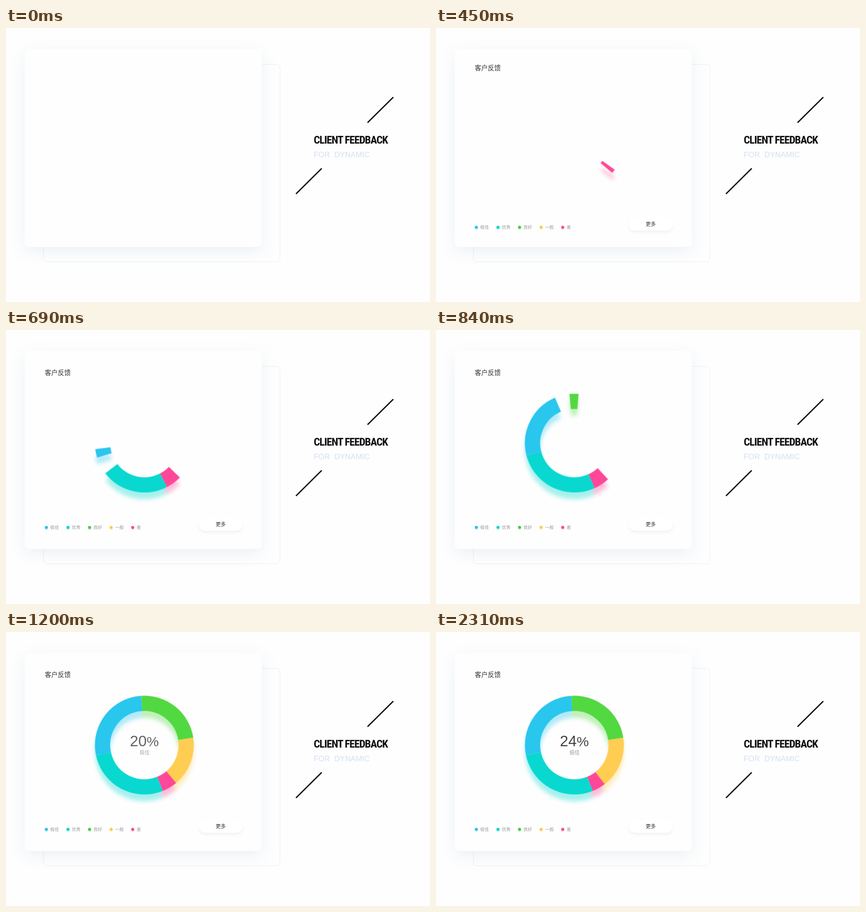
These frames come from a looping animation (930x602 px, 2340 ms). An HTML page:

```html
<!DOCTYPE html>
<html lang="zh-CN">
<head>
<meta charset="utf-8">
<title>Client feedback</title>
<style>
@property --n { syntax: "<integer>"; inherits: true; initial-value: 0; }

:root {
  --loop: 2340ms;
  --sine: cubic-bezier(.37, 0, .63, 1);
  --quad: cubic-bezier(.5, 1, .89, 1);
  --cubic: cubic-bezier(.33, 1, .68, 1);
  --cjk: "Noto Sans CJK SC", "Noto Sans CJK", "Noto Sans CJK JP", sans-serif;
  --blue: #29c6ee; --teal: #09d8d0; --green: #52d840; --yellow: #ffcd52; --pink: #ff4897;
}
html, body { margin: 0; width: 100%; height: 100%; overflow: hidden; background: #fefefe; }
svg, .card, .button, .count { position: absolute; }
svg { left: 0; top: 0; }
text { white-space: pre; }

.card {
  left: 41px; top: 46px; width: 520px; height: 435px; border-radius: 9px;
  background: #fefefe; box-shadow: 0 10px 34px rgba(110, 150, 190, .12);
}
.frame { fill: none; stroke: #e9edf0; }
.slash { stroke: #0c0c0c; stroke-width: 2.8; }
.head { font: 700 24px "Roboto Condensed", Roboto, sans-serif; font-stretch: 75%; letter-spacing: -1.1px; fill: #111; }
.sub { font: 16.5px "Liberation Sans", Arial, sans-serif; letter-spacing: .25px; fill: #d2dff0; }

.title { font: 500 14.25px var(--cjk); fill: #333; }
.legend { font: 9.5px var(--cjk); fill: #999; }
.button {
  left: 423px; top: 413px; width: 96px; height: 28px; border-radius: 14px;
  background: #fff; box-shadow: 0 4px 6px rgba(90, 120, 150, .09);
}
.button svg { overflow: visible; }
.button text { font: 11px var(--cjk); fill: #333; }

.drop, .rise { animation: drop var(--loop) var(--sine) infinite, appear var(--loop) linear infinite; }
.drop { --from: -18px; }
.rise { --from: 12px; }
@keyframes drop { 0% { transform: translateY(var(--from)); } 32.5%, 100% { transform: none; } }
@keyframes appear { 0%, 3.6% { opacity: 0; } 15.4%, 100% { opacity: 1; } }

.spin { animation: spin var(--loop) var(--cubic) infinite; }
@keyframes spin { 0%, 16.2% { transform: rotate(-18deg); } 55.8%, 100% { transform: rotate(0deg); } }

.arc {
  fill: none; stroke-width: 33.5; stroke-dasharray: var(--len) 720;
  animation: var(--loop) var(--sine) infinite;
}
.pink { animation-name: pink; }
.teal { animation-name: teal; }
.blue { animation-name: blue; }
.green { animation-name: green; }
.yellow { animation-name: yellow; animation-timing-function: var(--cubic); }
@keyframes pink { 0%, 16.2% { stroke-dasharray: 0 720; } 25.2%, 100% { stroke-dasharray: var(--len) 720; } }
@keyframes teal { 0%, 20.8% { stroke-dasharray: 0 720; } 33.3%, 100% { stroke-dasharray: var(--len) 720; } }
@keyframes blue { 0%, 26.9% { stroke-dasharray: 0 720; } 39.4%, 100% { stroke-dasharray: var(--len) 720; } }
@keyframes green { 0%, 33% { stroke-dasharray: 0 720; } 45.6%, 100% { stroke-dasharray: var(--len) 720; } }
@keyframes yellow { 0%, 39.1% { stroke-dasharray: 0 720; } 57%, 100% { stroke-dasharray: var(--len) 720; } }

.count {
  left: 203px; top: 219.6px; width: 201px; text-align: center;
  font: 33px/40px "Liberation Sans", Arial, sans-serif; color: #444;
  counter-reset: n var(--n);
  animation: count var(--loop) var(--quad) infinite, reveal var(--loop) var(--quad) infinite;
}
.count::before { content: counter(n); }
.count::after { content: "%"; font-size: 30px; }
.label { font: 11px var(--cjk); fill: #999; text-anchor: middle; animation: reveal var(--loop) var(--quad) infinite; }
@keyframes count { 0%, 39.7% { --n: 0; } 59.4%, 100% { --n: 24; } }
@keyframes reveal { 0%, 39.7% { opacity: 0; } 59.4%, 100% { opacity: 1; } }
</style>
</head>
<body>
<svg width="930" height="602">
  <rect class="frame" x="82" y="80" width="519" height="433.5" rx="8"/>
  <path class="slash" d="M793 208L849.5 152M636 364.5L692.5 308.5"/>
  <text class="head" x="675" y="254">CLIENT FEEDBACK</text>
  <text class="sub" x="675" y="284">FOR  DYNAMIC</text>
</svg>

<div class="card"></div>

<svg width="930" height="602">
  <defs>
    <filter id="glow" filterUnits="userSpaceOnUse" x="-160" y="-150" width="320" height="320" color-interpolation-filters="sRGB">
      <feGaussianBlur stdDeviation="5"/>
      <feOffset dy="15"/>
      <feComponentTransfer><feFuncA type="linear" slope=".36"/></feComponentTransfer>
      <feMerge><feMergeNode/><feMergeNode in="SourceGraphic"/></feMerge>
    </filter>
    <filter id="dotGlow" filterUnits="userSpaceOnUse" x="80" y="420" width="210" height="30" color-interpolation-filters="sRGB">
      <feGaussianBlur stdDeviation="1.2"/>
      <feOffset dy="2"/>
      <feComponentTransfer><feFuncA type="linear" slope=".36"/></feComponentTransfer>
      <feMerge><feMergeNode/><feMergeNode in="SourceGraphic"/></feMerge>
    </filter>
  </defs>

  <text class="title drop" x="85" y="98.9">客户反馈</text>

  <g transform="translate(303.5 248.5)" filter="url(#glow)">
    <g class="spin">
      <circle class="arc pink" r="91.75" pathLength="360" transform="rotate(49.4)" stroke="var(--pink)" style="--len:18.7"/>
      <circle class="arc teal" r="91.75" pathLength="360" transform="rotate(68.1)" stroke="var(--teal)" style="--len:100"/>
      <circle class="arc blue" r="91.75" pathLength="360" transform="rotate(168.1)" stroke="var(--blue)" style="--len:98.4"/>
      <circle class="arc green" r="91.75" pathLength="360" transform="rotate(266.5)" stroke="var(--green)" style="--len:84.8"/>
      <circle class="arc yellow" r="91.75" pathLength="360" transform="rotate(-8.7)" stroke="var(--yellow)" style="--len:60.8"/>
    </g>
  </g>
  <text class="label" x="304" y="269">极佳</text>

  <g class="legend rise">
    <g filter="url(#dotGlow)">
      <circle cx="88.5" cy="433.5" r="3.3" fill="#29c0ec"/>
      <circle cx="136" cy="433.5" r="3.3" fill="#09d3cb"/>
      <circle cx="183.3" cy="433.5" r="3.3" fill="#4cc744"/>
      <circle cx="230.6" cy="433.5" r="3.3" fill="#ffc94d"/>
      <circle cx="278" cy="433.5" r="3.3" fill="#ff4696"/>
    </g>
    <text x="97" y="436.9">极佳</text>
    <text x="144.4" y="436.9">优秀</text>
    <text x="191.8" y="436.9">良好</text>
    <text x="239.2" y="436.9">一般</text>
    <text x="286.6" y="436.9">差</text>
  </g>
</svg>

<div class="button rise">
  <svg width="96" height="28"><text x="37" y="18.2">更多</text></svg>
</div>
<div class="count"></div>
</body>
</html>
```
